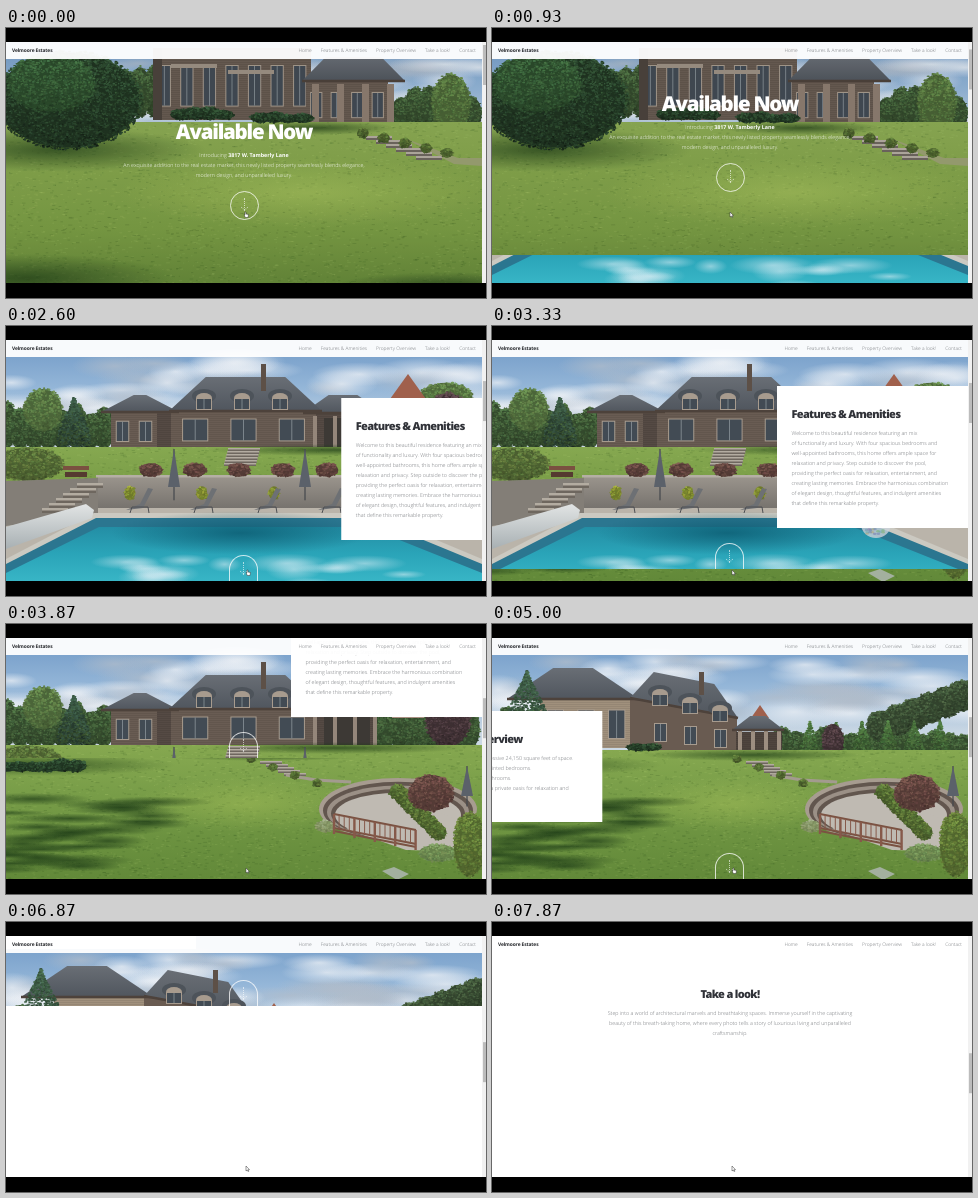
These frames come from a looping animation (480x270 px, 8000 ms). An HTML page with a canvas:

```html
<!DOCTYPE html>
<html lang="en">
<head>
<meta charset="utf-8">
<title>Estate landing page</title>
<style>
  html, body { margin: 0; width: 100%; height: 100%; overflow: hidden; background: #000; }
  #stage { position: relative; width: 480px; height: 270px; overflow: hidden; text-rendering: geometricPrecision;
    font: 300 5.35px/10px "Open Sans", "Noto Sans", sans-serif; color: #707377; }
  #page { position: absolute; top: 14px; width: 480px; height: 241px; overflow: hidden; background: #fff; }
  section { position: absolute; width: 476px; height: 241px; overflow: hidden; }
  canvas { position: absolute; left: 0; top: 0; }
  h1, h2, p { margin: 0; white-space: nowrap; position: relative; }
  h1, h2 { font-weight: 800; letter-spacing: -.06em; }
  h1 { font-size: 20.5px; line-height: 20px; margin-bottom: 7.5px; }
  h2 { font-size: 11px; line-height: 12px; margin-bottom: 6.5px; color: #303238; }
  b { font-weight: 700; }
  .center { text-align: center; }
  .hero { color: #fff; padding-top: 80px; height: 161px; }
  .card { position: absolute; box-sizing: border-box; padding: 23px 14.5px; background: #fff; overflow: hidden; }
  #features { left: 285px; top: 58px; width: 191px; height: 142px; }
  #overview { left: 0; top: 73px; width: 190px; height: 111px; }
  #look { padding-top: 53px; }
  .go { position: absolute; left: 223px; bottom: 0; box-sizing: border-box; width: 29px; height: 26px;
    border: 1px solid #ffffffc0; border-bottom: 0; border-radius: 14.5px 14.5px 0 0; }
  .hero .go { bottom: 63px; left: 224px; height: 29px; border-bottom: 1px solid #ffffffc0; border-radius: 50%; }
  .go::before, .go::after { content: ""; position: absolute; }
  .go::before { left: 13px; top: 6px; height: 12px; border-left: .7px dotted #fff9; }
  .go::after { left: 11.2px; top: 12.5px; width: 4px; height: 4px; border: dotted #fff9; border-width: 0 .7px .7px 0; transform: rotate(45deg); }
  nav { position: absolute; top: 0; left: 0; box-sizing: border-box; width: 476px; height: 17px; padding: 4px 6px;
    display: flex; gap: 9px; font-size: 4.87px; background: #fffffff2; white-space: nowrap; }
  nav b { color: #25272b; letter-spacing: -.02em; margin-right: auto; }
  #bar { position: absolute; right: 0; top: 0; width: 4px; height: 241px; background: #f1f1f1; }
  #thumb { position: absolute; top: 3px; left: .5px; width: 3px; height: 40px; background: #bcbcbc; }
  #cursor { position: absolute; left: 0; top: 0; overflow: visible; }
</style>
</head>
<body>
<div id="stage">
  <div id="page">
    <section class="hero center">
      <canvas width="476" height="241"></canvas>
      <h1>Available Now</h1>
      <p>Introducing <b>3817 W. Tamberly Lane</b><br>
        An exquisite addition to the real estate market, this newly listed property seamlessly blends elegance,<br>
        modern design, and unparalleled luxury.</p>
      <div class="go"></div>
    </section>
    <section>
      <canvas width="476" height="241"></canvas>
      <div class="go"></div>
      <div class="card" id="features">
        <h2>Features &amp; Amenities</h2>
        <p>Welcome to this beautiful residence featuring an mix<br>of functionality and luxury. With four spacious bedrooms and<br>well-appointed bathrooms, this home offers ample space for<br>relaxation and privacy. Step outside to discover the pool,<br>providing the perfect oasis for relaxation, entertainment, and<br>creating lasting memories. Embrace the harmonious combination<br>of elegant design, thoughtful features, and indulgent amenities<br>that define this remarkable property.</p>
      </div>
    </section>
    <section>
      <canvas width="476" height="241"></canvas>
      <div class="go"></div>
      <div class="card" id="overview">
        <h2>Property Overview</h2>
        <p>- Sprawling across an impressive 24,150 square feet of space.<br>- 4 luxurious and well-appointed bedrooms.<br>- 5 beautifully designed bathrooms.<br>- A stunning pool, creating a private oasis for relaxation and<br>enjoyment.</p>
      </div>
    </section>
    <section class="center" style="background:#fff">
      <div id="look">
        <h2>Take a look!</h2>
        <p>Step into a world of architectural marvels and breathtaking spaces. Immerse yourself in the captivating<br>beauty of this breath-taking home, where every photo tells a story of luxurious living and unparalleled<br>craftsmanship.</p>
      </div>
    </section>
    <nav><b>Velmoore Estates</b><span>Home</span><span>Features &amp; Amenities</span><span>Property Overview</span><span>Take a look!</span><span>Contact</span></nav>
    <div id="bar"><div id="thumb"></div></div>
  </div>
  <svg id="cursor" width="6" height="7" fill="#fff" stroke="#333" stroke-width=".5">
    <path id="arrow" d="M0 0V5L1.2 4L2 5.6L2.8 5.2L2 3.7H3.5Z"/>
    <path id="hand" d="M1 0V3L0 2.6L1.3 5.5H4L4.5 2.5L2 2V0Z"/>
  </svg>
</div>
<script>
const WIDTH = 476, PAGE = 241, TOP = 14, BOTTOM = TOP + PAGE, LOOP = 8000;
const $ = id => document.getElementById(id);
const sections = [...document.querySelectorAll('section')];
let g, seed = 7;
const rnd = (a = 0, b = 1) => a + (b - a) * ((seed = seed * 16807 % 2147483647) / 2147483647);
const times = (n, f) => { for (let i = 0; i < n; i++) f(i); };

// ---- drawing helpers, in stage coordinates ----
const TREE = [105, 25, 29], DARK = [125, 24, 22], SHRUB = [85, 36, 32], RUST = [10, 22, 33], PLUM = [345, 13, 27];

function trace(pts) {
  g.beginPath();
  for (let i = 0; i < pts.length; i += 2) g.lineTo(pts[i], pts[i + 1]);
}
function poly(fill, ...pts) { g.fillStyle = fill; trace(pts); g.fill(); }
function line(color, width, ...pts) { g.strokeStyle = color; g.lineWidth = width; trace(pts); g.stroke(); }
function box(fill, x, y, w, h) { g.fillStyle = fill; g.fillRect(x, y, w, h); }
function oval(fill, x, y, rx, ry) { g.fillStyle = fill; g.beginPath(); g.ellipse(x, y, rx, ry, 0, 0, 7); g.fill(); }
function fade(y0, y1, ...colors) {
  const f = g.createLinearGradient(0, y0, 0, y1);
  colors.forEach((c, i) => f.addColorStop(i / (colors.length - 1), c));
  return f;
}
function soft(rgb, alpha, x, y, rx, ry) {
  g.save(); g.translate(x, y); g.scale(rx, ry);
  const f = g.createRadialGradient(0, 0, 0, 0, 0, 1);
  f.addColorStop(0, `rgba(${rgb},${alpha})`);
  f.addColorStop(1, `rgba(${rgb},0)`);
  g.fillStyle = f; g.fillRect(-1, -1, 2, 2); g.restore();
}
const shade = (...at) => soft('28,58,22', .7, ...at);

function sky() {
  box(fade(TOP, 110, '#7099c6', '#94b6d8', '#cbd8e4'), 0, TOP, WIDTH, PAGE);
  times(50, () => soft(rnd() < .7 ? '236,240,245' : '176,188,202', .75, rnd(0, WIDTH), rnd(35, 95), rnd(25, 60), rnd(7, 17)));
}
function leaves(x, y, rx, ry, [h, s, l], cone) {
  if (!cone) oval(`hsl(${h},${s}%,${l - 6}%)`, x, y, rx * .95, ry * .95);
  times(rx * ry + 14, () => {
    const a = rnd(0, 6.3), r = Math.sqrt(rnd()), v = Math.sin(a) * r;
    const u = Math.cos(a) * r * (cone ? (v + 1.1) / 1.6 : 1);
    oval(`hsl(${h + rnd(-6, 6)},${s}%,${l - v * 6 + rnd(-7, 7)}%)`, x + u * rx, y + v * ry, rnd(.6, 1.7), rnd(.5, 1.2));
  });
}
function belt(x0, x1, base, height, tone, step = 14) {
  for (let x = x0; x <= x1; x += step) {
    const h = height * rnd(.7, 1);
    leaves(x, base - h / 2, step * .8, h / 2, tone);
  }
}
function lawn(y, ...colors) {
  box(fade(y, BOTTOM, ...colors), 0, y, WIDTH, BOTTOM - y);
  times(3000, () => box(rnd() < .5 ? '#e0ee9018' : '#1b3a1024', rnd(0, WIDTH), rnd(y, BOTTOM), rnd(1, 4), 1));
}
function wall(x, y, w, h, cols = 0, color = '#695c53') {
  box(color, x, y, w, h);
  times(h / 2, r => box('#00000016', x, y + r * 2, w, .8));
  const cell = w / cols;
  times(cols, i => pane(x + cell * (i + .25), y + h * .25, cell * .5, h * .55));
}
function pane(x, y, w, h) {
  box('#a79b8e', x - 1, y - 1, w + 2, h + 2);
  box('#424b54', x, y, w, h);
  box('#8b949a', x + w / 2 - .4, y, .8, h);
}
function roof(x, y, w, h, inset, drop = 0) {
  poly(fade(y, y + h + drop, '#696e75', '#50565e'), x, y + h, x + w * inset, y, x + w * (1 - inset), y + drop * .6, x + w, y + h + drop);
  line('#4d423b', 2.5, x, y + h, x + w, y + h + drop);
}
function dormer(x, y) {
  oval('#4d535a', x, y, 12, 7);
  oval('#a79b8e', x, y + 2, 8, 5); pane(x - 7, y + 3, 14, 10);
}
function stairs(x, y, dx, dy, w, n) {
  times(n, i => {
    box('#b3aca1', x + i * dx, y + i * dy, w, dy);
    box('#6e675f', x + i * dx, y + i * dy + dy * .5, w, dy * .5);
  });
}
function umbrella(x, y, h) {
  box('#45484c', x - .6, y, 1.2, h * 1.35);
  poly('#5b616a', x, y, x + 6, y + h, x - 6, y + h);
}

// ---- the three fixed backgrounds ----
function frontLawn() {
  sky();
  belt(120, 160, 90, 70, TREE);
  belt(395, WIDTH, 103, 46, TREE);
  leaves(445, 75, 20, 30, [95, 30, 36]);
  wall(147, 20, 158, 72, 7);
  box('#4c433d', 147, 20, 9, 72);
  times(2, i => box('#9c9184', 165 + i * 57, 36 + i * 6, 46, 4));
  wall(300, 54, 82, 44, 4);
  roof(296, 29, 103, 24, .23);
  times(4, i => box('#8d7d70', 306 + i * 25, 56, 7, 42));
  lawn(94, '#8cab54', '#83a44b', '#7a9c44', '#66893a');
  poly('#9aa172', 398, 110, 452, 130, WIDTH, 130, WIDTH, 138, 448, 136);
  shade(50, 122, 150, 22); shade(310, 100, 80, 7); shade(20, 250, 150, 24); shade(440, 258, 110, 14);
  soft('200,220,110', .35, 300, 165, 190, 35);
  belt(175, 220, 92, 14, DARK); belt(255, 300, 95, 12, DARK);
  stairs(360, 108, 10, 4, 26, 6);
  times(5, i => leaves(357 + i * 21, 105 + i * 5, 6, 5, SHRUB));
  leaves(62, 72, 75, 50, DARK); leaves(45, 55, 45, 30, [120, 26, 29]);
  box('#0000000c', 0, TOP, WIDTH, PAGE);
}

function poolside() {
  sky();
  belt(0, 100, 124, 50, TREE); belt(365, WIDTH, 126, 48, TREE);
  leaves(37, 84, 20, 22, [95, 28, 37]); leaves(440, 72, 28, 16, [95, 28, 38]);
  poly('#a98f82', 386, 72, 418, 72, 418, 94, 386, 94); poly('#a0604c', 384, 73, 402, 48, 420, 73);
  leaves(68, 99, 19, 29, [140, 20, 25], true);
  leaves(442, 95, 23, 29, PLUM);
  wall(105, 86, 262, 38, 0, '#554a44');
  wall(105, 87, 46, 35, 2);
  wall(165, 84, 145, 38, 3);
  box('#3d3935', 318, 92, 46, 30);
  roof(95, 69, 78, 17, .42); roof(297, 69, 80, 18, .32); roof(163, 51, 153, 34, .24);
  box('#5d5047', 255, 38, 5, 27);
  times(3, i => dormer(198 + i * 38, 70));
  times(4, i => box('#94867a', 307 + i * 20, 90, 4, 32));
  lawn(121, '#86a850', '#6f9540', '#5d8336');
  shade(330, 124, 130, 6);
  stairs(222, 122, -.8, 3, 32, 6);
  leaves(22, 138, 36, 17, [85, 33, 34]);
  poly('#837e77', 385, 152, WIDTH, 168, WIDTH, 190, 385, 185);
  box('#bab4aa', 0, 180, WIDTH, 75);
  poly('#837e77', 0, 155, 92, 152, 92, 187, 0, 200);
  box(fade(150, 182, '#9b958d', '#77736e'), 92, 151, 294, 31); box('#b5afa5', 90, 149, 298, 2.5);
  stairs(71, 157, -7, 5, 26, 6); stairs(386, 157, 4, 5, 31, 6);
  times(5, i => leaves(145 + i * 44, 144, 12, 7, RUST));
  times(4, i => {
    const x = 134 + i * 64;
    leaves(x - 10 + i * 8, 167, 5.5, 7, [68, 48, 38]);
    poly('#6d7074', x + 8, 162, x + 13, 163, x + 3, 182, x - 14, 184, x, 178);
    line('#4c4e52', 1, x - 10, 187, x - 8, 181, x + 8, 181, x + 9, 187);
  });
  for (const x of [70, 403]) { box('#7a5040', x - 13, 140, 26, 4); box('#553a30', x - 11, 146, 22, 5); }
  for (const x of [168, 299]) umbrella(x, 123, 38);
  const basin = (fill, y, inset) => poly(fill, 88 + inset, y, 366 - inset, y, WIDTH, y + 46, WIDTH, BOTTOM, 0, BOTTOM, 0, y + 46);
  basin('#cbc9c1', 187, 0);
  basin('#2b7690', 192, 2);
  basin(fade(200, BOTTOM, '#238da4', '#2aa4b8', '#38b5c6'), 201, 5);
  soft('10,88,110', .75, 235, 207, 130, 22);
  times(16, () => soft('205,232,240', .6, rnd(120, 400), rnd(232, 258), rnd(15, 45), rnd(4, 12)));
  poly(fade(180, 222, '#dfe2e2', '#a9b1b4'), 0, 201, 80, 178, 88, 184, 86, 192, 0, 223);
  oval('#c9d2dacc', 384, 198, 15, 14);
  times(40, () => oval(`hsla(${rnd(40, 300)},28%,58%,.6)`, 384 + rnd(-11, 11), 198 + rnd(-10, 10), 1.8, 1.2));
}

function garden() {
  sky();
  belt(0, 60, 128, 55, TREE); belt(290, WIDTH, 136, 36, TREE);
  times(6, i => leaves(390 + i * 16, 102 - i * 6, 16, 16, [105, 20, 28]));
  times(6, i => leaves(318 + i * 26, 119, 12, 22, [105, 30, 31], true));
  leaves(341, 117, 11, 18, PLUM);
  wall(48, 74, 92, 50, 3, '#a0907c');
  poly('#695b51', 138, 72, 245, 94, 245, 131, 138, 124);
  wall(244, 108, 46, 22, 0, '#4f453e');
  times(4, i => box('#9d8e80', 246 + i * 13, 107, 4, 25));
  roof(15, 44, 132, 31, .35); roof(138, 48, 108, 26, .22, 20);
  times(3, i => { dormer(168 + i * 30, 68 + i * 8); pane(163 + i * 30, 100 + i * 3, 11, 17); });
  box('#5d5047', 207, 48, 5, 23);
  poly('#a0604c', 259, 94, 268, 81, 277, 94); roof(240, 92, 52, 14, .35);
  leaves(35, 82, 25, 36, [135, 20, 28], true);
  lawn(126, '#86a850', '#789d48', '#6c9240', '#628939');
  shade(20, 141, 150, 11); shade(260, 131, 110, 6);
  times(26, i => shade(rnd(-20, 175 - i * 3), 175 + i * 2.8, rnd(35, 70), rnd(3, 7)));
  soft('195,215,100', .3, 240, 180, 110, 28);
  belt(0, 75, 148, 14, DARK); belt(145, 172, 127, 8, DARK);
  stairs(254, 137, 6, 3, 22, 5);
  line('#a39b8f', 3, 280, 151, 310, 156, 345, 158);
  times(4, i => leaves(245 + i * 22, 135 + i * 8, 4.5, 4, SHRUB));
  ['#a79c90', '#62564e', '#9b9086', '#62564e', '#bfbab2'].forEach((c, i) => oval(c, 392, 185 + i * 1.5, 79 - i * 4, 31 - i * 2.2));
  poly('#bfbab2', 340, 205, 400, 175, WIDTH, 205, WIDTH, 228, 400, 226);
  times(9, i => leaves(392 + i * 5, 168 + i * 5, 9, 8, SHRUB));
  leaves(425, 169, 23, 19, RUST);
  umbrella(461, 142, 30);
  leaves(319, 202, 10, 6, [80, 20, 52]); leaves(432, 229, 20, 9, [90, 26, 46]); leaves(464, 220, 17, 33, [82, 38, 35]);
  for (const dy of [0, 14, 17]) line('#7b5242', 2, 328, 190 + dy, 410, 206 + dy);
  times(17, i => line('#86594a', i % 4 ? 1 : 2.4, 328 + i * 5.1, 190 + i, 328 + i * 5.1, (i % 4 ? 204 : 210) + i));
  poly('#a3b09f', 376, 247, 388, 243, 403, 250, 391, 256);
}

[frontLawn, poolside, garden].forEach((paint, i) => {
  g = sections[i].querySelector('canvas').getContext('2d');
  g.translate(0, -TOP);
  paint();
});

// ---- motion ----
const clamp = x => Math.min(1, Math.max(0, x));
const swing = x => .5 - Math.cos(Math.PI * clamp(x)) / 2;
function ease(x) { // cubic-bezier(.25, .1, .25, 1)
  const bezier = (a, b, s) => 3 * a * s * (1 - s) ** 2 + 3 * b * s * s * (1 - s) + s ** 3;
  let lo = 0, hi = 1;
  times(24, () => {
    const mid = (lo + hi) / 2;
    if (bezier(.25, .25, mid) < x) lo = mid; else hi = mid;
  });
  return bezier(.1, 1, lo);
}
const SCROLLS = [597, 3120, 5913], SCROLL_TIME = 1500;
const slide = (t, start) => ease(clamp((t - start) / 1000));
const move = (el, x, y) => el.style.transform = `translate(${x}px,${y}px)`;

function draw(t) {
  const scroll = Math.round(PAGE * SCROLLS.reduce((sum, s) => sum + swing((t - s) / SCROLL_TIME), 0));
  sections.forEach((section, i) => {
    const y = i * PAGE - scroll, canvas = section.querySelector('canvas');
    move(section, 0, y);
    if (canvas) move(canvas, 0, -y);
  });
  move($('features'), 191 * (1 - slide(t, 2160)), 0);
  move($('overview'), -190 * (1 - slide(t, 4665)), 0);
  $('look').style.opacity = clamp((t - 7610) / 260);
  move($('thumb'), 0, scroll * .158);

  const down = swing((t - 1100) / 500);
  move($('cursor'), 238 + 2 * down, 184 + 60 * down);
  const onLink = t < 700 || t > 2100 && t < 3250 || t > 4600 && t < 6000;
  $('hand').style.display = onLink ? '' : 'none';
  $('arrow').style.display = onLink ? 'none' : '';
}
const start = performance.now();
function tick() {
  draw((performance.now() - start) % LOOP);
  requestAnimationFrame(tick);
}
tick();
</script>
</body>
</html>
```
